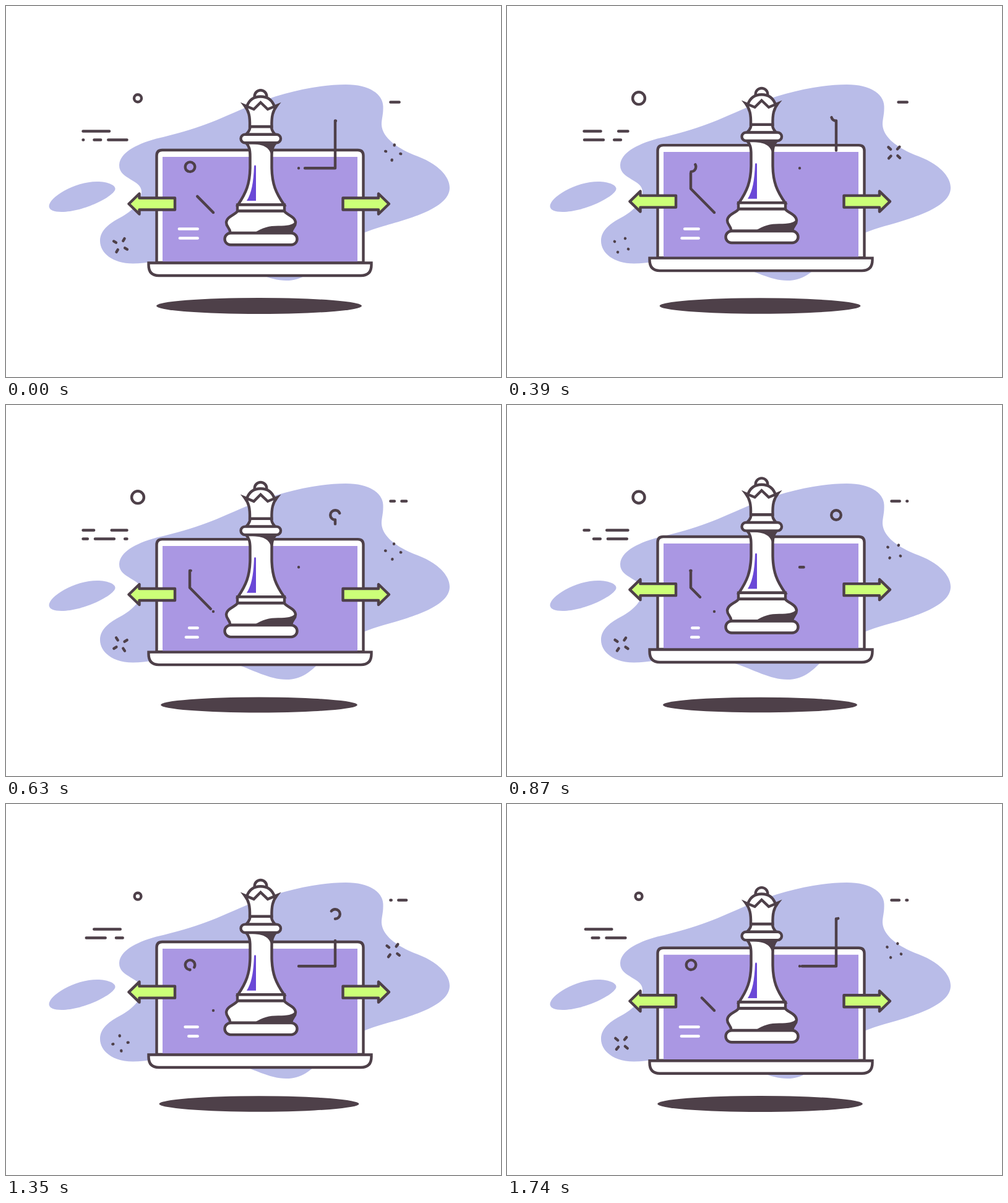
Recreate the animation shown at these times as an HTML page. Size 800 by 600 pixels, loop 1800 ms.

```html
<!DOCTYPE html>
<html lang="en">
<head>
<meta charset="utf-8">
<title>Chess strategy laptop</title>
<style>
  html, body { margin: 0; width: 100%; height: 100%; overflow: hidden; background: #fff; }
  svg { display: block; width: 100vw; height: 100vh; }
  .ink { stroke: #4e4049; stroke-width: 4.4; fill: none; stroke-linecap: round; }
  .white { fill: #fff; }
  .dark { fill: #4e4049; }
  .blob { fill: #b9bce8; }
  .round { stroke-linejoin: round; }
</style>
</head>
<body>
<svg viewBox="0 0 800 600">
  <defs>
    <path id="arrow" class="ink round" style="fill:#ccff78"
      d="M198.5 320L215.5 303.5V310.5H273V329.5H215.5V336.5Z"/>
  </defs>

  <g class="blob">
    <path d="M549 127C588 127 609 143 609.5 162C610 176 607 182 607 192C608 213 633 231 665 243
      C697 255 717 275 717 294C717 325 660 342 610 356C560 371 535 385 515 407C497 428 480 444 453 444
      C425 444 400 428 365 417C330 407 290 407 240 413.5C228 415 217 416.5 205 416.5
      C172 416.5 152 399 152 380C152 362 168 351 185 342C205 331 219 317 219 300
      C219 281 183 280 183 258C183 240 205 225 243 214.5C320 197 345 182 395 161
      C440 142 500 127 549 127Z"/>
    <path d="M69.5 324C69 310 110 284 147 284C165 284 177 290 176.5 296C175 308 125 333 90 333
      C77 333 70 330 69.5 324Z"/>
  </g>

  <ellipse id="shadow" class="dark" cx="409" cy="485" rx="166" ry="13"/>

  <g id="laptop">
    <path class="ink white" d="M243.5 415V242Q243.5 233 252.5 233H568.5Q577.5 233 577.5 242V415Z"/>
    <path fill="#aa97e3" d="M253 244H568V415H253Z"/>
    <path class="ink white" d="M230.5 415.5H590.5V419Q590.5 436 573.5 436H247Q230.5 436 230.5 419Z"/>
  </g>

  <g class="ink">
    <path id="bar1" stroke="#fff"/>
    <path id="bar2" stroke="#fff"/>
    <circle id="ring" cx="213" cy="149.2"/>
    <path id="dash1" d="M124.5 202.5H195.5"/>
    <path id="dash2" d="M124.5 216.5H195.5"/>
    <path id="dash3" d="M621.4 155.5H647.1"/>
    <path id="spark1"/>
    <path id="spark2"/>
    <g class="round">
      <path id="stemR" d="M473 262.3H532V185.8"/>
      <path id="loopR" d="M532 185.8a7.8 7.8 0 0 1 0 -15.6a7.8 7.8 0 0 1 0 15.6"/>
      <path id="stemL" d="M335 334L297 295.5V268"/>
      <path id="loopL" d="M297.5 268a7.8 7.8 0 0 1 0 -15.6a7.8 7.8 0 0 1 0 15.6"/>
    </g>
  </g>

  <g id="arrows">
    <use href="#arrow"/>
    <use href="#arrow" transform="translate(817.5) scale(-1 1)"/>
  </g>

  <g id="queen">
    <circle class="ink white" cx="411.5" cy="146" r="9.8"/>
    <path class="ink white" d="M389 163C393 151 402 146.5 411.5 146.5C421 146.5 430 151 434 163L424 175H400Z"/>
    <path class="ink white" d="M394.5 195C394.5 202 391 204 388 208H435C432 204 429 202 429 195Z"/>
    <path class="ink white" stroke-miterlimit="10"
      d="M385.5 160.8L400.5 167L411.5 156L423 167L438 160.8C431 170 429 178 429.5 195H394C394.5 178 392.5 170 385.5 160.8Z"/>
    <path class="ink white" d="M388 221C393 227 394.5 232 394.5 243V262C394 288 388 302 375 321.5H449.5
      C436 302 430 288 429.5 262V243C429.5 232 431 227 436 221Z"/>
    <path class="dark" d="M394 221H436C431 228 430 236 429.5 246C427 229 419 223.5 394 223.2Z"/>
    <path fill="#6a48d7" d="M404 259V315H389C397 303 400 285 401 259Q402.5 255.5 404 259Z"/>
    <rect class="ink white" x="379.5" y="207.8" width="64.5" height="13.4" rx="6.7"/>
    <path class="ink white" d="M374.5 331.5C370 338 357 340 356 350C356 358 362 358 362.5 367H461
      C462 358 468 358 468 350C467 340 454 338 449.5 331.5Z"/>
    <path class="dark" d="M401 367C415 358 425 355.5 440 355.5C455 355.5 463 354 467 349C469 357 462 360 461 367Z"/>
    <rect class="ink white" x="374" y="321.5" width="76" height="9.8"/>
    <rect class="ink white" x="353.5" y="367.3" width="117" height="19" rx="9.5"/>
  </g>
</svg>
<script>
const LOOP = 1800, STEP = 30;
const TAU = 2 * Math.PI;
const $ = id => document.getElementById(id);
const set = (id, attrs) => {
  for (const k in attrs) $(id).setAttribute(k, attrs[k]);
};
const mod = (a, n) => ((a % n) + n) % n;
const clamp = x => Math.min(1, Math.max(0, x));
const ease = x => { x = clamp(x); return x * x * (3 - 2 * x); };
const sharpEase = x => x * x * x * (10 - 15 * x + 6 * x * x);

// Vertical float, measured from the pose at t = 0.
function float(id, t, range, delay) {
  const w = TAU / LOOP;
  const y = range / 2 * (Math.cos(w * (t - delay)) - Math.cos(w * delay));
  set(id, { transform: `translate(0 ${y})` });
  return -y / range;
}

// Goes 0 -> 1 -> 0 over one loop.
function swing(t, delay) {
  const x = mod(t - delay, LOOP) / (LOOP / 2);
  return sharpEase(x < 1 ? x : 2 - x);
}

function slide(id, dashes, shift) {
  set(id, { "stroke-dasharray": dashes.join(" "), "stroke-dashoffset": -shift });
}

// Draws a path on from its start, then wipes it off in the same direction.
function trim(id, t, start, drawTime, wipeAt, wipeTime) {
  const age = mod(t - start, LOOP);
  const head = ease(age / drawTime), tail = ease((age - wipeAt) / wipeTime);
  const len = $(id).getTotalLength();
  const show = head - tail > 0.001;
  set(id, {
    visibility: show ? "visible" : "hidden",
    "stroke-dasharray": `0 ${tail * len} ${(head - tail) * len} ${len * 2}`
  });
}

const TIMES = [0, 390, 630, 870, 1110, 1350, 1740, 1800];
const TURN1 = [31, -61.4, -123, -146, -206.5, -276, -320, -329];
const TURN2 = [9.5, -47, -84, -145, -206, -233, -333.5, -350.5];

function track(values, t) {
  let i = 0;
  while (i < TIMES.length - 2 && t >= TIMES[i + 1]) i++;
  const p = (t - TIMES[i]) / (TIMES[i + 1] - TIMES[i]);
  return values[i] + (values[i + 1] - values[i]) * p;
}

function spark(id, cx, cy, angle, t, peak) {
  const len = 0.1 + 5.1 * ease(0.5 + 0.5 * Math.cos(TAU * (t - peak) / 900));
  let d = "";
  for (let i = 0; i < 4; i++) {
    const a = (angle + i * 90) * Math.PI / 180;
    const at = r => `${cx + r * Math.cos(a)} ${cy + r * Math.sin(a)}`;
    d += `M${at(12.7 - len)}L${at(12.7)}`;
  }
  set(id, { d });
}

function draw(t) {
  const lift = float("laptop", t, 20, 0);
  float("queen", t, 20, 120);
  float("arrows", t, 24, 120);
  set("shadow", { rx: 166 - 9 * lift, ry: 13 - 0.7 * lift });

  set("bar1", { d: `M${279.8 + 19.5 * swing(t, 0)} 360.5H309.7` });
  set("bar2", { d: `M${280.2 + 19 * swing(t, 150)} 375.5H309.7` });

  const grow = ease(mod(t - 1710, LOOP) / 390);
  const shrink = t >= 780 && t < 1710 ? ease((t - 780) / 480) : 0;
  set("ring", { r: 5.4 + 4.5 * (grow - shrink) });

  const p = t / LOOP;
  slide("dash1", [42.5, 28.5], -71 * p);
  slide("dash2", [31, 17.2, 10.8, 12], 40.7 + 142 * p);
  slide("dash3", [14.2, 11.5], 51.4 * p);

  spark("spark1", 185, 387, track(TURN1, t), t, 750);
  spark("spark2", 625.7, 237, track(TURN2, t), t, 300);

  trim("stemR", t, 750, 900, 900, 900);
  trim("loopR", t, 180, 720, 810, 900);
  trim("stemL", t, 1380, 900, 900, 900);
  trim("loopL", t, 800, 745, 870, 850);
}

function tick() {
  const t = performance.now() % LOOP;
  draw(Math.min(Math.floor(t / STEP) * STEP, LOOP - 2 * STEP));
  requestAnimationFrame(tick);
}
tick();
</script>
</body>
</html>
```
